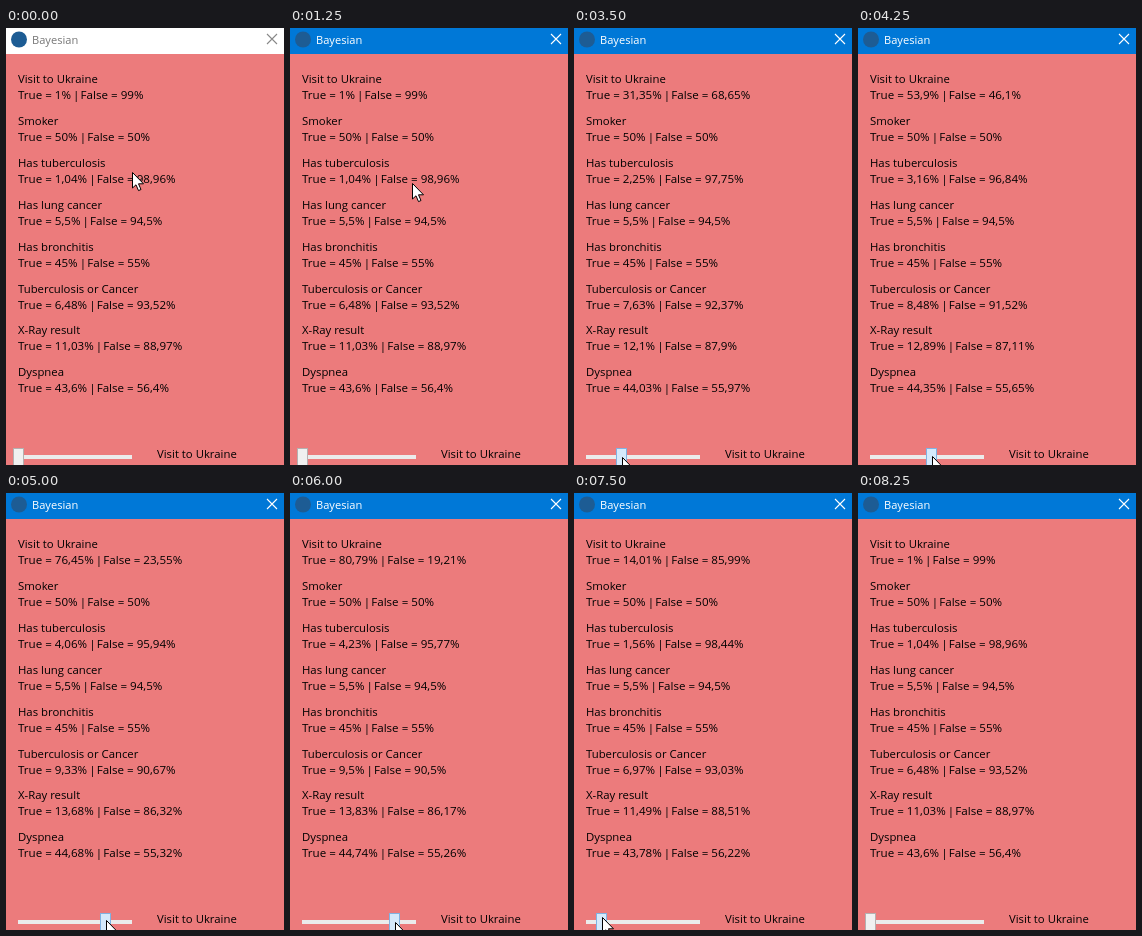
An HTML page that plays this animation: 278x437 px, repeating every 9 s.

```html
<!DOCTYPE html>
<html lang="en">
<head>
<meta charset="utf-8">
<title>Bayesian</title>
<style>
  html, body { margin: 0; width: 100%; height: 100%; overflow: hidden; background: #ec7b7c; }
  svg { display: block; width: 278px; height: 437px; }
  text { font: 11.35px "Open Sans", "Noto Sans", sans-serif; fill: #000; white-space: pre; }
  .value { font-size: 11.6px; }
  .split { letter-spacing: -0.95px; }
  #bar { fill: #fff; }
  #caption { font-size: 11.1px; fill: #777; }
  #close { stroke: #888; stroke-width: 1.1; }
  .active #bar { fill: #0078d7; }
  .active #caption { fill: #fff; }
  .active #close { stroke: #fff; }
  #thumb { fill: #f0f0f0; stroke: #b4b0b0; }
  .held #thumb { fill: #d5e9fb; stroke: #7fb2e2; }
</style>
</head>
<body>
<svg id="stage" viewBox="0 0 278 437">
  <rect width="278" height="437" fill="#ec7b7c"/>
  <rect id="bar" width="278" height="26"/>
  <circle cx="13" cy="11.5" r="8" fill="#1d5c94"/>
  <text id="caption" x="26" y="16">Bayesian</text>
  <path id="close" d="M261 6l10 10m0-10l-10 10"/>
  <g id="rows"></g>
  <rect x="12" y="427" width="114" height="4" fill="#ebebeb"/>
  <rect id="thumb" x="-4.5" y="420.5" width="10" height="17"/>
  <text x="151" y="430">Visit to Ukraine</text>
  <path id="cursor" d="M.5.5V16L4 12.8 6.5 18.6 9 17.5 6.5 11.8H11.5Z" fill="#fff" stroke="#000"/>
</svg>
<script>
const STEP = 250, LOOP = 9000, FOCUS = 3, GRAB = 8, DROP = 33;
const labels = ["Visit to Ukraine", "Smoker", "Has tuberculosis", "Has lung cancer",
  "Has bronchitis", "Tuberculosis or Cancer", "X-Ray result", "Dyspnea"];

// Turning points of the drag: [step, percent, pointer y]
const drag = [[GRAB, 1, 427], [10, 15.74, 429], [14, 31.35, 429], [20, 76.45, 427],
  [22, 95, 428], [24, 80.79, 429], [30, 14.01, 424], [DROP, 1, 445]];

const $ = id => document.getElementById(id);
const stage = $("stage"), thumb = $("thumb"), cursor = $("cursor");
const mix = (a, b, t) => a + (b - a) * t;

function addText(y, className) {
  const t = document.createElementNS("http://www.w3.org/2000/svg", "text");
  t.setAttribute("class", className);
  t.setAttribute("x", 12);
  t.setAttribute("y", y);
  return $("rows").appendChild(t);
}

const values = labels.map((label, i) => {
  const y = Math.round(55 + i * 41.9);
  addText(y, "label").textContent = label;
  const value = addText(y + 16, "value");
  value.innerHTML = '<tspan></tspan><tspan class="split"> | </tspan><tspan></tspan>';
  return value;
});

function dragAt(step, col) {
  const i = Math.max(1, drag.findIndex(k => k[0] >= step));
  const a = drag[i - 1], b = drag[i];
  const t = Math.max(0, (step - a[0]) / (b[0] - a[0]));
  return mix(a[col], b[col], t);
}

// Marginals of the chest clinic network for a given chance of a visit
function infer(visit) {
  const tb = mix(0.01, 0.05, visit);
  const either = lung => 1 - (1 - tb) * (1 - lung);
  const dyspnea = (lung, bronchitis) =>
    mix(mix(0.1, 0.8, bronchitis), mix(0.7, 0.9, bronchitis), either(lung));
  const e = either(0.055);
  const d = (dyspnea(0.1, 0.6) + dyspnea(0.01, 0.3)) / 2;
  return [visit, 0.5, tb, 0.055, 0.45, e, mix(0.05, 0.98, e), d];
}

const percent = n => String(n / 100).replace(".", ",") + "%";

function move(el, x, y) {
  el.setAttribute("transform", `translate(${Math.round(x)} ${Math.round(y)})`);
}

function draw(step) {
  const value = dragAt(step, 1);
  infer(value / 100).forEach((p, i) => {
    const n = Math.round(p * 10000);
    const [yes, , no] = values[i].children;
    yes.textContent = `True = ${percent(n)}`;
    no.textContent = `False = ${percent(10000 - n)}`;
  });

  // The pointer lingers, rushes to the thumb, then rides along with it
  const x = 12 + (value - 1) * 1.15;
  const reach = Math.min(1, step / GRAB) ** 7;
  move(thumb, x, 0);
  move(cursor, mix(126, x + 1, reach), mix(144, dragAt(step, 2), reach));

  stage.classList.toggle("active", step >= FOCUS);
  stage.classList.toggle("held", step >= GRAB && step < DROP);
}

let shown = -1;
function tick() {
  const step = Math.min(DROP, Math.floor(performance.now() % LOOP / STEP));
  if (step !== shown) draw(shown = step);
  requestAnimationFrame(tick);
}
tick();
</script>
</body>
</html>
```
